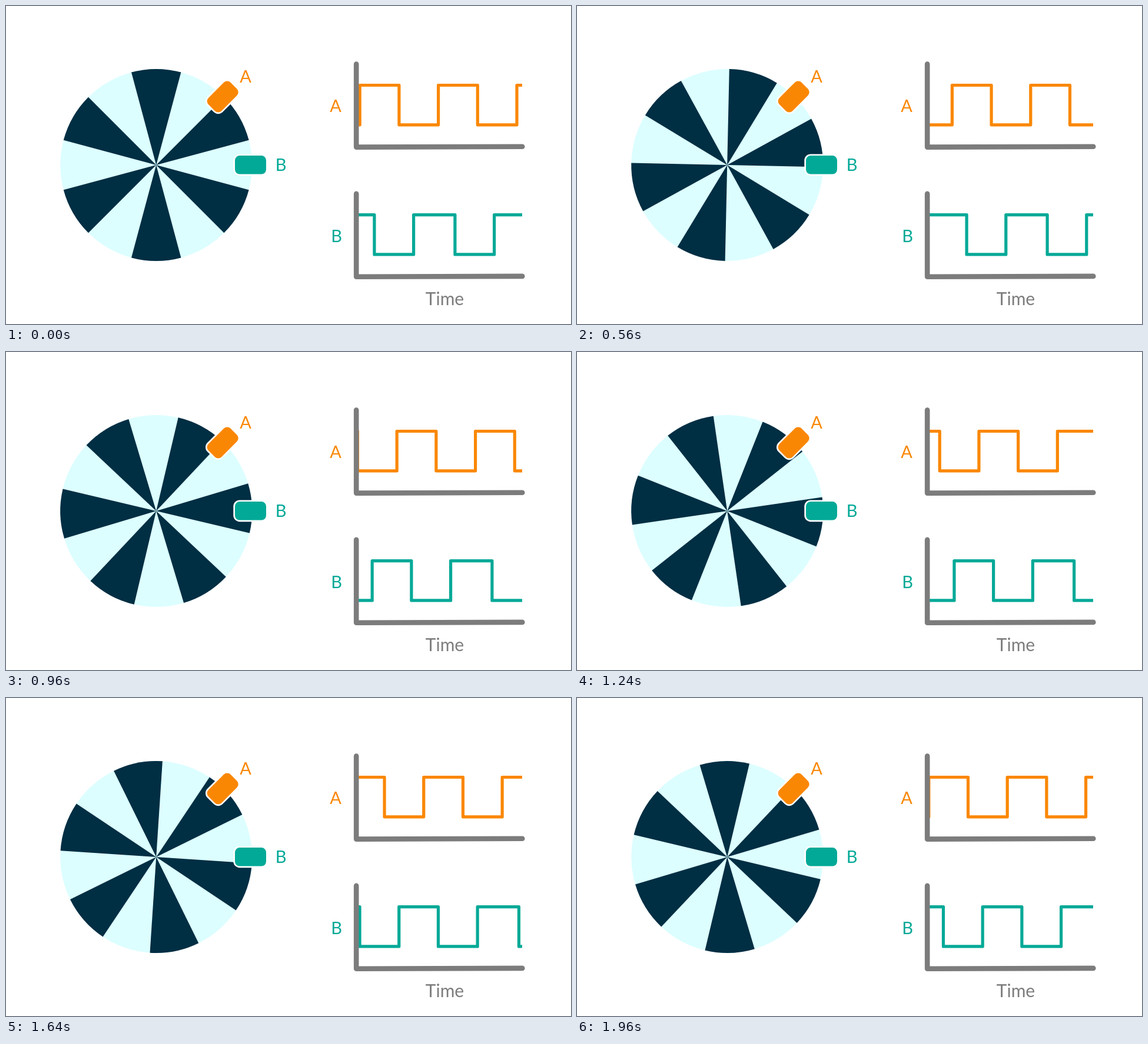
Animation of 960x540 px, one loop 2000 ms. Source, as an HTML page with a canvas:

```html
<!DOCTYPE html>
<html lang="en">
<head>
<meta charset="utf-8">
<title>Quadrature encoder</title>
<style>
  html, body { margin: 0; width: 100%; height: 100%; overflow: hidden; background: #fff; }
  canvas, svg { position: absolute; left: 0; top: 0; width: 960px; height: 540px; display: block; }
  text { font: 29px Lato, "Open Sans", sans-serif; text-anchor: middle; }
  .a { fill: #fa8703; }
  .b { fill: #03a997; }
  .time { fill: #7c7c7c; font-size: 30px; }
</style>
</head>
<body>
<canvas id="stage" width="960" height="540"></canvas>
<svg viewBox="0 0 960 540">
  <text class="a" x="407" y="130.3">A</text>
  <text class="b" x="467" y="280.3">B</text>
  <text class="a" x="560" y="179.5">A</text>
  <text class="b" x="561.7" y="401.3">B</text>
  <text class="time" x="745.5" y="508.3">Time</text>
</svg>
<script>
const ctx = document.getElementById('stage').getContext('2d');
const LOOP = 2000, STEP = 40, LAG = 20;
const ORANGE = '#fa8703', TEAL = '#03a997', GREY = '#7c7c7c';
const DARK = '#002e43', LIGHT = '#dcfeff';
const HUB = { x: 255.2, y: 270, r: 163 };
const RAD = Math.PI / 180;
const HALF = 66.7;

// Edges of each wave at time zero, starting with a rising one.
const edgesA = Array.from({ length: 7 }, (_, i) => 601.2 + (i - 2) * HALF);
// One high pulse of B is a little wider than the rest.
const edgesB = Array.from({ length: 7 }, (_, i) => 692.6 + (i - 4) * HALF + (i > 4 ? 3.6 : 0));

function drawWheel(angle) {
  const { x, y, r } = HUB;
  ctx.fillStyle = LIGHT;
  ctx.beginPath();
  ctx.arc(x, y, r, 0, 2 * Math.PI);
  ctx.fill();
  ctx.fillStyle = DARK;
  for (let i = 0; i < 6; i++) {
    const mid = angle - 90 + i * 60;
    ctx.beginPath();
    ctx.moveTo(x, y);
    ctx.arc(x, y, r, (mid - 15) * RAD, (mid + 15) * RAD);
    ctx.fill();
  }
}

function drawSensor(x, y, turn, color) {
  ctx.save();
  ctx.translate(x, y);
  ctx.rotate(turn * RAD);
  ctx.beginPath();
  ctx.roundRect(-26.5, -15.7, 53, 31.4, 8);
  ctx.strokeStyle = '#fff';
  ctx.lineWidth = 5.4;
  ctx.stroke();
  ctx.fillStyle = color;
  ctx.fill();
  ctx.restore();
}

function drawWave(edges, shift, top, color) {
  const low = top + 67.3;
  let y = low;
  ctx.save();
  ctx.beginPath();
  ctx.rect(597, top - 10, 280, 90);
  ctx.clip();
  ctx.beginPath();
  ctx.moveTo(300, y);
  for (const edge of edges) {
    const x = edge + shift;
    ctx.lineTo(x, y);
    y = y === low ? top : low;
    ctx.lineTo(x, y);
  }
  ctx.lineTo(1200, y);
  ctx.strokeStyle = color;
  ctx.lineWidth = 5.2;
  ctx.lineJoin = 'round';
  ctx.stroke();
  ctx.restore();
}

function drawAxes(top) {
  ctx.beginPath();
  ctx.moveTo(595.2, top);
  ctx.lineTo(595.2, top + 141);
  ctx.lineTo(877.3, top + 140.2);
  ctx.strokeStyle = GREY;
  ctx.lineWidth = 8.6;
  ctx.lineCap = ctx.lineJoin = 'round';
  ctx.stroke();
}

function draw(time) {
  const run = Math.max(0, time - LAG);
  const shift = run * 0.067;
  ctx.fillStyle = '#fff';
  ctx.fillRect(0, 0, 960, 540);
  drawWheel(run * 0.0301);
  drawSensor(368.2, 154, -45, ORANGE);
  drawSensor(415.5, 269.8, 0, TEAL);
  drawWave(edgesA, shift, 134.5, ORANGE);
  drawWave(edgesB, shift, 354.6, TEAL);
  drawAxes(98.6);
  drawAxes(318.7);
}

const start = performance.now();
function tick() {
  const t = (performance.now() - start) % LOOP;
  draw(Math.floor(t / STEP) * STEP);
  requestAnimationFrame(tick);
}
tick();
</script>
</body>
</html>
```
